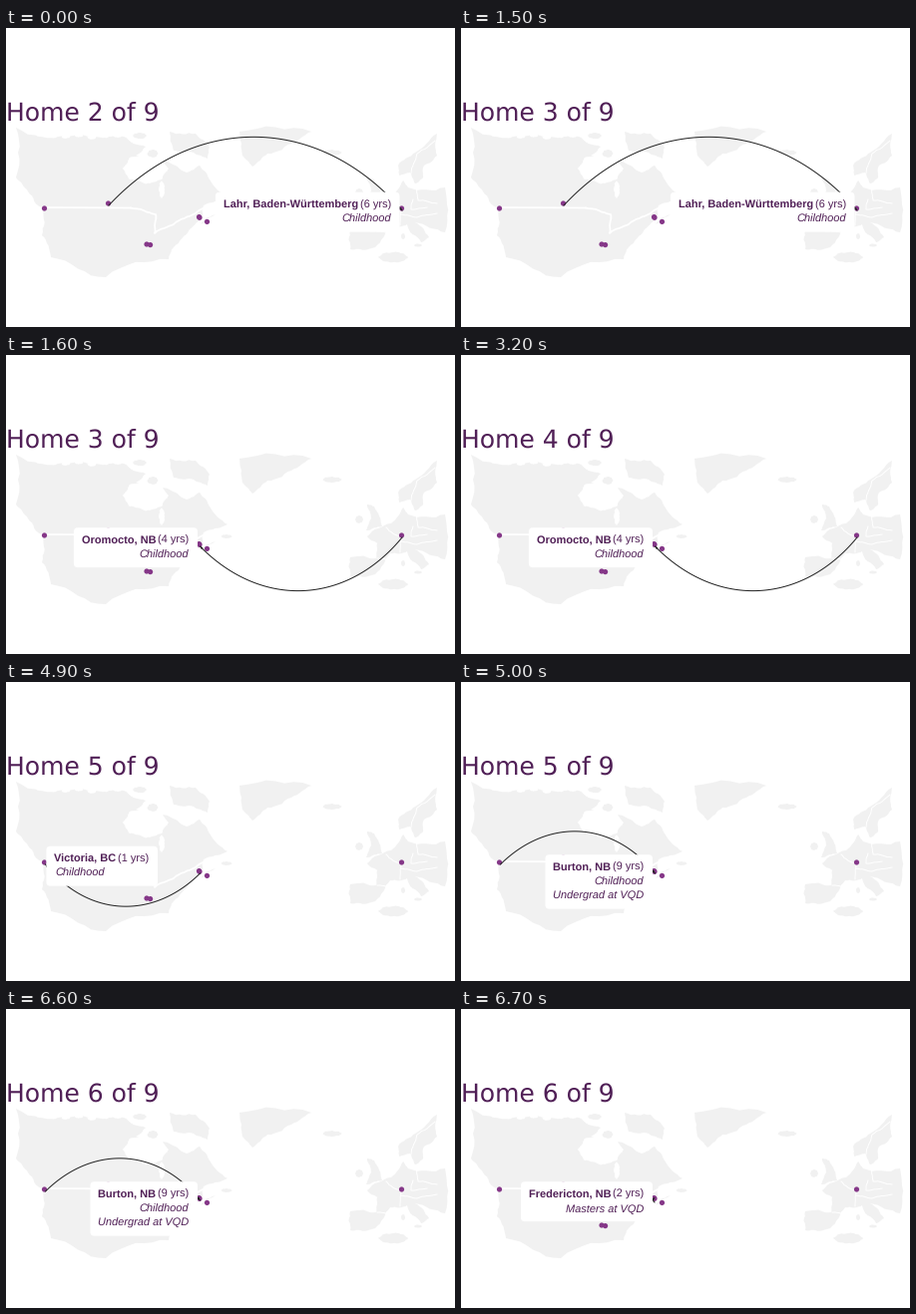
Recreate the animation shown at these times as a matplotlib script. Size 450 by 300 pixels, loop 8000 ms.

```python
import numpy as np
import matplotlib.pyplot as plt
from matplotlib.animation import FuncAnimation
from matplotlib.patches import Circle, FancyBboxPatch, Polygon, Rectangle

W, H, DPI = 450, 300, 100
PX = 72 / DPI
INK, DOT, LAND, LINE = "#501f56", "#853788", "#f1f1f1", "#222222"
plt.rcParams["text.hinting"] = "none"
rng = np.random.default_rng(4)

fig = plt.figure(figsize=(W / DPI, H / DPI), dpi=DPI, facecolor="white")
ax = fig.add_axes([0, 0, 1, 1])
ax.set(xlim=(0, W), ylim=(H, 0))
ax.axis("off")

map_clip = Rectangle((22, 107), 406.5, 122, transform=ax.transData)
arc_clip = Rectangle((22, 100), 406.5, 136.2, transform=ax.transData)


def rough(pts, amount=0.1, depth=3):
    """Fray a path by pushing its midpoints sideways, again and again."""
    p = np.array(pts, float)
    for _ in range(depth):
        d = np.diff(p, axis=0)
        push = amount * rng.uniform(-1, 1, (len(d), 1))
        q = np.empty((2 * len(p) - 1, 2))
        q[::2] = p
        q[1::2] = (p[:-1] + p[1:]) / 2 + push * np.c_[-d[:, 1], d[:, 0]]
        p = q
    return p


def coast(*pts, color=LAND):
    ax.add_patch(Polygon(rough([*pts, pts[0]]), fc=color, ec="none",
                         clip_path=map_clip))


def blob(x, y, w, h, color=LAND):
    a = np.linspace(0, 2 * np.pi, 9)[:-1]
    coast(*zip(x + w / 2 * np.cos(a), y + h / 2 * np.sin(a)), color=color)


def border(*pts, width=1.0):
    ax.plot(*rough(pts, 0.08).T, color="white", lw=width * PX,
            clip_path=map_clip)


# North America, with its bays and lakes cut out in white
coast((10, 100), (62, 109), (118, 109), (140, 119), (130, 128), (162, 134),
      (181, 145), (194, 138), (204, 152), (222, 170), (198, 178), (197, 189),
      (184, 202), (168, 220), (163, 232), (100, 250), (45, 230), (36, 208),
      (37, 182), (22, 164), (10, 150))
blob(140, 141, 46, 31, "white")
blob(156, 162, 6, 18, "white")
for x in range(34, 140, 13):
    blob(x, 108 + rng.uniform(-1, 2), 9, 4, "white")
coast((164, 104), (190, 106), (204, 120), (202, 131), (183, 124), (168, 123))
blob(147, 126, 11, 8)
blob(134, 108, 14, 6)
coast((195, 197), (210, 187), (199, 192))
blob(221, 182, 11, 4)
ax.plot([36, 125], [180, 180.5], color="white", lw=1.8 * PX)
border((125, 180.5), (150, 187), (149, 206), (168, 197), (190, 186),
       (204, 177), width=1.8)

# Greenland, Iceland and Europe
coast((234, 104), (237, 128), (247, 139), (262, 126), (289, 114), (306, 104))
blob(327, 125, 19, 6)
coast((362, 150), (369, 152), (377, 172), (361, 176), (366, 163))
blob(354, 165, 8, 8)
coast((432, 106), (410, 125), (393, 138), (394, 148), (405, 145), (410, 156),
      (418, 150), (419, 138), (432, 128))
coast((398, 153), (403, 160), (440, 160), (440, 205), (410, 195), (424, 210),
      (416, 215), (402, 197), (385, 199), (370, 220), (345, 222), (345, 203),
      (371, 204), (372, 189), (362, 182), (386, 169))
blob(413, 218, 8, 3)
blob(398, 209, 4, 6)
blob(388, 230, 30, 10)
border((372, 204), (384, 206))
border((381, 173), (396, 183), (395, 198))
border((396, 187), (412, 190), (432, 186))
border((412, 161), (413, 173), (432, 176))
border((408, 172), (406, 182), (422, 180))
border((406, 146), (412, 126), (430, 113))

for x, y in [(38.5, 181), (102.5, 176), (141, 217), (144.6, 217.6),
             (193.5, 189.6), (194, 190.3), (201.5, 194.4), (396.5, 181)]:
    ax.add_patch(Circle((x, y), 2.6, fc=DOT, ec="none", zorder=3))


def arc(p, q, rise=0.242, pull=0.29):
    """Cubic curve from p to q, bulging to the left of travel."""
    p, q = np.array(p, float), np.array(q, float)
    d = q - p
    up = rise * 4 / 3 * np.array([d[1], -d[0]])
    t = np.linspace(0, 1, 80)[:, None]
    return ((1 - t) ** 3 * p + 3 * t * (1 - t) ** 2 * (p + pull * d + up)
            + 3 * t ** 2 * (1 - t) * (q - pull * d + up) + t ** 3 * q)


def text(x, y, s, size=11, **kw):
    return ax.text(x, y, s, fontsize=size * PX, color=INK, va="baseline",
                   **{"family": "Liberation Sans", "zorder": 6, **kw})


def scene(p, q, right, base, place, years, notes, left=None):
    pts = arc(p, q)
    line, = ax.plot(*pts.T, color=LINE, lw=PX, zorder=4, clip_path=arc_clip)
    d = pts[-1] - pts[-4]
    d /= np.hypot(*d)
    side = 1.3 * np.array([-d[1], d[0]])
    back = pts[-1] - 3 * d
    head = ax.add_patch(Polygon([pts[-1], back + side, back - side],
                                fc=LINE, ec="none", zorder=4))

    name = text(right - 33, base, place, weight="bold", ha="right")
    x0 = name.get_window_extent().x0 * W / fig.bbox.width - 8
    card = ax.add_patch(FancyBboxPatch(
        (x0, base - 15.8), right + 8.5 - x0, 25.5 + 14.5 * len(notes),
        boxstyle="round,pad=0,rounding_size=4", fc="white", ec="none",
        zorder=5))
    parts = [line, head, card, name,
             text(right, base, f"({years} yrs)", ha="right")]
    parts += [text(left or right - 0.5, base + 14.5 * i, s, style="italic",
                   ha="left" if left else "right")
              for i, s in enumerate(notes, 1)]
    return parts


WEST, PRAIRIE, EAST, RHINE = (39.5, 183), (103, 178), (194.5, 192), (397, 183)
scenes = [
    scene(PRAIRIE, RHINE, 386, 180.5, "Lahr, Baden-Württemberg", 6,
          ["Childhood"]),
    scene(RHINE, EAST, 183.5, 189, "Oromocto, NB", 4, ["Childhood"]),
    scene(EAST, WEST, 143.5, 180.5, "Victoria, BC", 1, ["Childhood"], left=49),
    scene(WEST, EAST, 183.5, 189, "Burton, NB", 9,
          ["Childhood", "Undergrad at VQD"]),
    scene((194, 194), (193.7, 189.5), 183.5, 189, "Fredericton, NB", 2,
          ["Masters at VQD"]),
]
title = text(0, 93, "", size=25, family="DejaVu Sans")

FRAMES, STEP, FIRST = 80, 17, 15


def update(i):
    # The title changes one tick before the map does.
    title.set_text(f"Home {2 + (i + STEP - FIRST) // STEP} of 9")
    now = (i + STEP - FIRST - 1) // STEP
    for k, parts in enumerate(scenes):
        for part in parts:
            part.set_visible(k == now)
    return []


anim = FuncAnimation(fig, update, frames=FRAMES, interval=100, repeat=True,
                     init_func=lambda: update(0))
plt.show()
```
